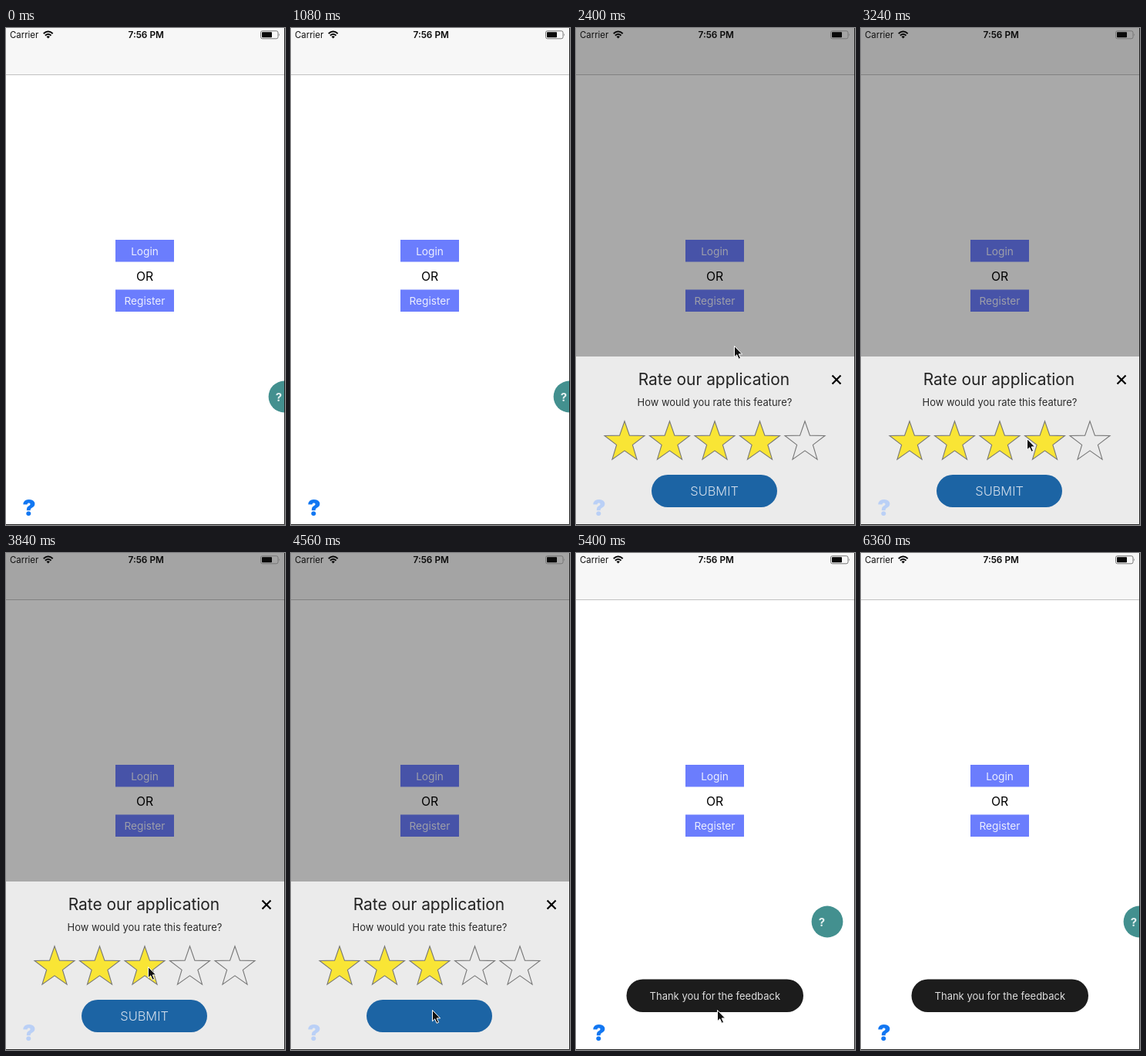
Write an HTML page that moves like this. It is 362 px wide and 643 px high and loops after 6.48 s.

```html
<!DOCTYPE html>
<html lang="en">
<head>
<meta charset="utf-8">
<title>Rate our application</title>
<style>
  html, body { margin: 0; width: 100%; height: 100%; overflow: hidden; background: #fff; }
  svg { display: block; width: 100vw; height: 100vh; }
  text { font-family: Inter, Roboto, "Liberation Sans", sans-serif; }
  .mid { text-anchor: middle; }
  .light { font-weight: 300; }
</style>
</head>
<body>
<svg viewBox="0 0 362 643">
  <rect width="362" height="643" fill="#fff"/>
  <rect width="362" height="60" fill="#f7f7f7"/>
  <rect y="60" width="362" height="1" fill="#c2c2c2"/>

  <g class="mid" font-size="13.7">
    <rect x="142" y="274" width="76" height="28.5" fill="#6b7dfd"/>
    <text class="mid" x="180" y="293.5" fill="#eceefe">Login</text>
    <text class="mid" x="180" y="326.5" font-size="15.8">OR</text>
    <rect x="142" y="338.5" width="76" height="28.5" fill="#6b7dfd"/>
    <text class="mid" x="180" y="358" fill="#eceefe">Register</text>
  </g>
  <text class="mid" x="30" y="630.5" font-size="29" font-weight="900" fill="#1277f2">?</text>

  <g id="help">
    <circle r="20.4" fill="#43908f"/>
    <text class="mid" x="-7" y="5.5" font-size="15" font-weight="700" fill="#e4f0f0">?</text>
  </g>

  <g id="toast">
    <rect x="65.5" y="551.5" width="229.5" height="42.5" rx="21.2" fill="#1c1c1c"/>
    <text class="mid" x="180.3" y="577.5" font-size="13" fill="#dedede">Thank you for the feedback</text>
  </g>

  <g id="modal">
    <rect width="362" height="643" fill="#000" fill-opacity=".337"/>
    <rect y="425" width="362" height="218" fill="#ebebeb"/>
    <text class="mid" x="179" y="462.3" font-size="20.9" fill="#222">Rate our application</text>
    <text class="mid" x="180" y="488.5" font-size="12.95" fill="#2c2c2c">How would you rate this feature?</text>
    <path d="M332.5 449.500l11 11m0-11l-11 11" stroke="#000" stroke-width="2.2"/>
    <g id="stars" stroke="#777" stroke-width="1.1"></g>
    <rect x="98" y="578" width="163" height="42" rx="21" fill="#1c64a4"/>
    <text id="submit" class="mid light" x="179.600" y="605" font-size="16.4" fill="#d3dfec">SUBMIT</text>
    <text class="mid" x="30" y="630.5" font-size="29" font-weight="900" fill="#bad0f6">?</text>
  </g>

  <text x="5" y="13" font-size="11.4" fill="#111">Carrier</text>
  <text class="mid" x="181.700" y="13" font-size="11.8" font-weight="600" fill="#0a0a0a">7:56 PM</text>
  <g fill="none" stroke="#0a0a0a" stroke-width="2">
    <path d="M48.700 7.200Q54.700 1.800 60.700 7.200"/>
    <path d="M50.900 9.700Q54.700 6.300 58.500 9.700"/>
    <path d="M54.700 13.500l-2.200-2.300q2.200-1.700 4.400 0z" fill="#0a0a0a" stroke="none"/>
  </g>
  <rect x="330.500" y="3.800" width="22.500" height="10" rx="2.200" fill="none" stroke="#777"/>
  <rect x="332" y="5.300" width="13" height="7" rx=".8" fill="#0a0a0a"/>
  <path d="M354.300 7q1.600 1.800 0 3.600z" fill="#777"/>

  <path id="cursor" d="M.5 .5V14.800L3.700 11.800L6.100 17.300L8.600 16.200L6.200 10.900H10.600Z"
        fill="#111" stroke="#fff" stroke-width="1" stroke-linejoin="round"/>

  <path d="M361.500 0V642.500H0" fill="none" stroke="#222"/>
</svg>
<script>
const LOOP = 6480, STEP = 120;
const $ = id => document.getElementById(id);
const help = $('help'), toast = $('toast'), modal = $('modal');
const submit = $('submit'), cursor = $('cursor');

// Tables of [time, x, y]
const CURSOR = [
  [2280, 200, 407], [2400, 205, 411], [3240, 215, 531], [3720, 184, 535],
  [3960, 184, 535], [4440, 183, 591], [5640, 183, 591], [5880, 183, 597], [6240, 189, 558]
];
const HELP = [
  [0, 361, 477], [4560, 378, 477], [4680, 378, 477], [5400, 326, 477],
  [5520, 326, 477], [6240, 361, 477]
];

function at(keys, t) {
  const i = keys.findIndex(k => k[0] >= t);
  if (i < 0) return keys[keys.length - 1].slice(1);
  if (i === 0) return keys[0].slice(1);
  const [t0, x0, y0] = keys[i - 1], [t1, x1, y1] = keys[i];
  const p = (t - t0) / (t1 - t0);
  return [x0 + (x1 - x0) * p, y0 + (y1 - y0) * p];
}

function starPoints(cx, cy, r) {
  return Array.from({ length: 10 }, (_, i) => {
    const a = i * Math.PI / 5, d = i % 2 ? r * 0.4 : r;
    return (cx + d * Math.sin(a)).toFixed(2) + ',' + (cy - d * Math.cos(a)).toFixed(2);
  }).join(' ');
}

const stars = Array.from({ length: 5 }, (_, i) => {
  const s = document.createElementNS('http://www.w3.org/2000/svg', 'polygon');
  s.setAttribute('points', starPoints(63 + i * 58.5, 536, 27.3));
  return $('stars').appendChild(s);
});

const show = (el, on) => { el.style.display = on ? '' : 'none'; };
const place = (el, [x, y]) => el.setAttribute('transform', `translate(${x} ${y})`);

function draw(t) {
  show(modal, t >= 2400 && t < 4680);
  show(toast, t >= 4680);
  show(submit, t < 4560);
  show(cursor, t >= 2280 && t < 6360);
  place(cursor, at(CURSOR, t));
  place(help, t < 4560 ? [361, 477] : at(HELP, t));
  const rating = t < 3840 ? 4 : 3;
  stars.forEach((s, i) => s.setAttribute('fill', i < rating ? '#f9e535' : 'none'));
}

const start = performance.now();
function frame() {
  const t = (performance.now() - start) % LOOP;
  draw(Math.floor(t / STEP) * STEP);
  requestAnimationFrame(frame);
}
frame();
</script>
</body>
</html>
```
